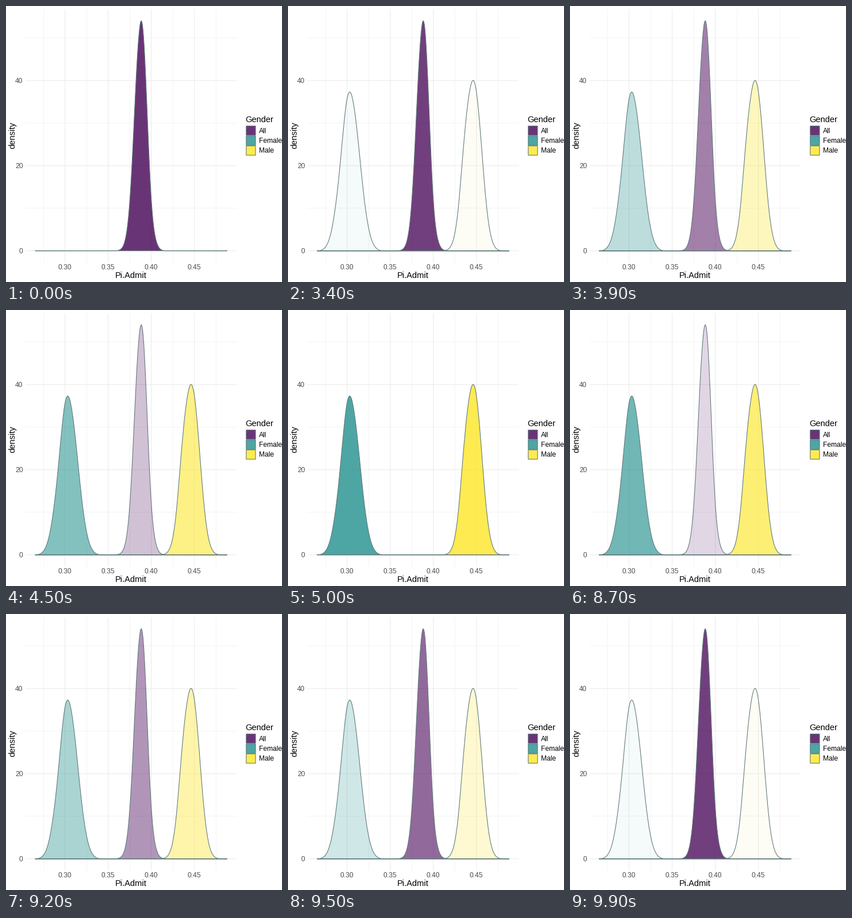
Write a matplotlib script that moves like this. It is 480x480 px and loops after 10 s.

```python
import numpy as np
import matplotlib.pyplot as plt
from matplotlib.animation import FuncAnimation
from matplotlib.colors import to_rgba
from matplotlib.patches import Polygon, Rectangle

plt.rcParams["font.family"] = ["Liberation Sans", "DejaVu Sans"]

PT = 0.72  # points per pixel at 100 dpi
FRAMES, INTERVAL = 100, 100
STEPS = 59  # fade clock ticks per loop
LEFT, RIGHT, TOP, BOTTOM = 34.2, 401.0, 5.6, 445.8
FIRST, LAST, BASE = 50.6, 384.6, 425.7
KEY = 17.28
ALPHA = 0.8
OUTLINE = "#60787B"
FILLS = {"All": "#440154", "Female": "#21908C", "Male": "#FDE725"}

# Peak height, then x at -4 ... 4 standard deviations, all in pixels
SIGMAS = np.arange(-4, 5)
BELLS = {
    "All": (400, [190, 201, 212.3, 223.2, 235.2, 245.3, 255.1, 267, 277]),
    "Female": (276.2, [51, 61, 75.6, 92.3, 106.8, 124.3, 140.6, 155.6, 165]),
    "Male": (296.3, [268, 279, 291.6, 304.4, 322, 336.6, 350, 363, 373]),
}


def bell(height, xs):
    """Outline of a skewed normal curve, closed along the baseline."""
    z = np.linspace(-4, 4, 161)
    x = sum(np.interp(z + d, SIGMAS, xs) for d in (-0.3, 0, 0.3)) / 3 + 0.2
    y = BASE - height * np.exp(-z ** 2 / 2)
    return np.vstack([(FIRST, BASE), np.column_stack([x, y]), (LAST, BASE)])


def progress(i):
    """0 = only All is shown, 1 = only Female and Male are shown."""
    step = i * STEPS // FRAMES
    return min(1, max(0, (19.5 - abs(step - 39)) / 9.33))


def x_pos(v):
    return 102.7 + (v - 0.30) * 1500


def y_pos(v):
    return BASE - v * 7.4


fig = plt.figure(figsize=(4.8, 4.8), dpi=100, facecolor="white")
ax = fig.add_axes([0, 0, 1, 1])
ax.set_xlim(0, 480)
ax.set_ylim(480, 0)
ax.axis("off")


def line(xs, ys, width):
    ax.plot(xs, ys, color="#EBEBEB", lw=width * PT, snap=False,
            solid_capstyle="butt", zorder=1)


def label(x, y, s, size=12, **kw):
    ax.text(x, y, s, fontsize=size * PT, va="baseline", **kw)


def shape(patch, **kw):
    patch.set(edgecolor=OUTLINE, linewidth=1.07 * PT, snap=False, **kw)
    return ax.add_patch(patch)


for k in range(5):
    line([x_pos(0.275 + 0.05 * k)] * 2, [TOP, BOTTOM], 0.53)
for v in (10, 30, 50):
    line([LEFT, RIGHT], [y_pos(v)] * 2, 0.53)
for v in (0.30, 0.35, 0.40, 0.45):
    line([x_pos(v)] * 2, [TOP, BOTTOM], 1.07)
    label(x_pos(v), 458, f"{v:.2f}", color="#4D4D4D", ha="center")
for v in (0, 20, 40):
    line([LEFT, RIGHT], [y_pos(v)] * 2, 1.07)
    label(29.5, y_pos(v) + 4, str(v), color="#4D4D4D", ha="right")

label(217, 473, "Pi.Admit", 14.67, ha="center")
label(15, 225, "density", 14.67, ha="center", rotation=90,
      rotation_mode="anchor")

label(416.7, 202, "Gender", 14.67)
side = KEY - 1.07
for row, (name, fill) in enumerate(FILLS.items()):
    y = 208.7 + KEY * row
    shape(Rectangle((417.8, y), side, side), facecolor=to_rgba(fill, ALPHA))
    label(440, y + 12.2, name)

areas = {name: shape(Polygon(bell(*spec), closed=True), joinstyle="bevel",
                     zorder=3 + z)
         for z, (name, spec) in enumerate(BELLS.items())}


def draw(i):
    p = progress(i)
    for name, area in areas.items():
        share = 1 - p if name == "All" else p
        area.set_visible(share > 0)
        area.set_facecolor(to_rgba(FILLS[name], ALPHA * share))
    return list(areas.values())


anim = FuncAnimation(fig, draw, frames=FRAMES, interval=INTERVAL,
                     repeat=True, repeat_delay=0, blit=False)
plt.show()
```
